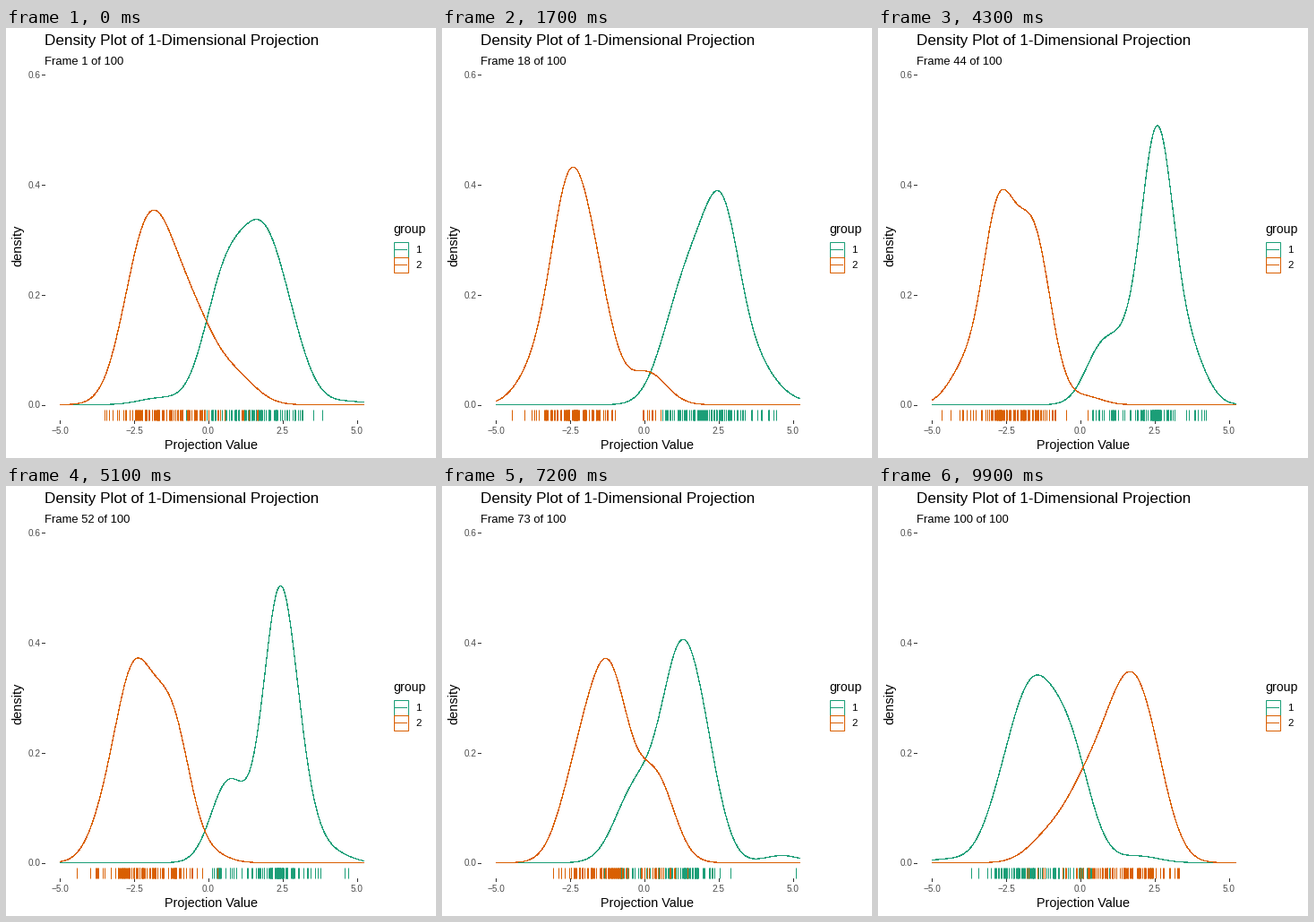
These frames come from a looping animation (480x480 px, 10000 ms). A matplotlib script:

```python
import numpy as np
import matplotlib.pyplot as plt
from matplotlib.animation import FuncAnimation
from matplotlib.patches import Rectangle

FRAMES = 100
GREEN, ORANGE = "#1B9E77", "#D95F02"
LO, HI = -5.0, 5.22
PT = 0.72  # points per pixel at 100 dpi

# Each group is a planar cloud of clusters: (percent, x, y).
GROUP1 = [(40, 1.75, 2.23), (26, 0.45, 2.5), (12, 0.8, 0.45), (10, 2.6, 0.8),
          (9, 2.67, 3.1), (2, -1.66, 4.38), (1, 4.7, 2.0)]
GROUP2 = [(32, -1.68, -2.33), (22, -2.4, -0.9), (14, -0.95, -1.6),
          (15, -0.3, -2.9), (8, -2.34, -3.42), (7, 1.0, -1.6), (2, 0.3, 0.1)]

# Every cluster is a flattened Gaussian, narrow along AXIS.
AXIS = np.radians(75)
NARROW, WIDE, SMOOTHING = 0.54, 0.68, 0.38

plt.rcParams["font.family"] = "Liberation Sans"
rng = np.random.default_rng(7)


def unit(angle):
    return np.array([np.cos(angle), np.sin(angle)])


def view_angle(i):
    """Half a turn that lags a little late in the loop."""
    u = i / (FRAMES - 1)
    return np.radians(176 * u - 9 * np.sin(np.pi * u ** 3))


def density(clusters, angle, x):
    s = np.hypot(NARROW * np.cos(angle - AXIS), WIDE * np.sin(angle - AXIS))
    weight, *centre = np.array(clusters).T
    z = (x[:, None] - unit(angle) @ np.array(centre)) / s
    return np.exp(-z * z / 2) @ (weight / 100) / (s * np.sqrt(2 * np.pi))


def sample(clusters):
    """Points whose smoothed projections have the clusters' densities."""
    spread = np.sqrt(np.array([NARROW, WIDE]) ** 2 - SMOOTHING ** 2)
    axes = np.array([unit(AXIS), unit(AXIS + np.pi / 2)])
    return np.vstack([[x, y] + (rng.normal(size=(n, 2)) * spread) @ axes
                      for n, x, y in clusters])


def px(x):
    return 226 + 33.15 * x


def py(d):
    return 420.5 - 613.5 * d


fig = plt.figure(figsize=(4.8, 4.8), dpi=100, facecolor="white")
ax = fig.add_axes([0, 0, 1, 1])
ax.set(xlim=(0, 480), ylim=(480, 0))
ax.axis("off")


def label(x, y, s, size, color="black", **kw):
    return ax.text(x, y, s, fontsize=size * PT, color=color, **kw)


def rule(xs, ys, color):
    ax.plot(xs, ys, color=color, lw=PT)


label(43, 19, "Density Plot of 1-Dimensional Projection", 17.15)
subtitle = label(43, 41, "", 13)
label(229, 470, "Projection Value", 14.4, ha="center")
label(13.5, 243, "density", 14.5, rotation=90, ha="center", va="center")

for d in (0, 0.2, 0.4, 0.6):
    label(38.5, py(d), f"{d:.1f}", 10, "#4D4D4D", ha="right", va="center_baseline")
    rule([40, 43], [py(d)] * 2, "#333333")
for x in (-5, -2.5, 0, 2.5, 5):
    label(px(x), 453, f"{x:.1f}".replace("-", "\u2212"), 10, "#4D4D4D", ha="center")
    rule([px(x)] * 2, [438, 441], "#333333")

label(432, 229, "group", 14.1)
for name, y, color in (("1", 238.5, GREEN), ("2", 255.5, ORANGE)):
    ax.add_patch(Rectangle((432.5, y), 16, 17, fill=False, ec=color, lw=PT))
    rule([434, 447], [y + 8] * 2, color)
    label(457, y + 12.5, name, 11.5)

xs = np.linspace(LO, HI, 341)
groups = []
for clusters, color, z in ((GROUP1, GREEN, 3), (GROUP2, ORANGE, 4)):
    # A hairline without antialiasing fills one crisp pixel.
    curve, = ax.plot([], [], color=color, lw=0.15, antialiased=False, zorder=z)
    rug = ax.vlines([], 426, 438, color=color, lw=PT, zorder=z + 2)
    groups.append((clusters, sample(clusters), curve, rug))


def update(i):
    angle = view_angle(i)
    subtitle.set_text(f"Frame {i + 1} of {FRAMES}")
    for clusters, points, curve, rug in groups:
        curve.set_data(px(xs), py(density(clusters, angle, xs)))
        p = points @ unit(angle)
        shown = px(p[(p >= LO) & (p <= HI)])
        rug.set_segments([[(x, 426), (x, 438)] for x in shown])
    return []


anim = FuncAnimation(fig, update, frames=FRAMES, interval=100,
                     init_func=lambda: update(0), repeat=True, repeat_delay=0)
plt.show()
```
